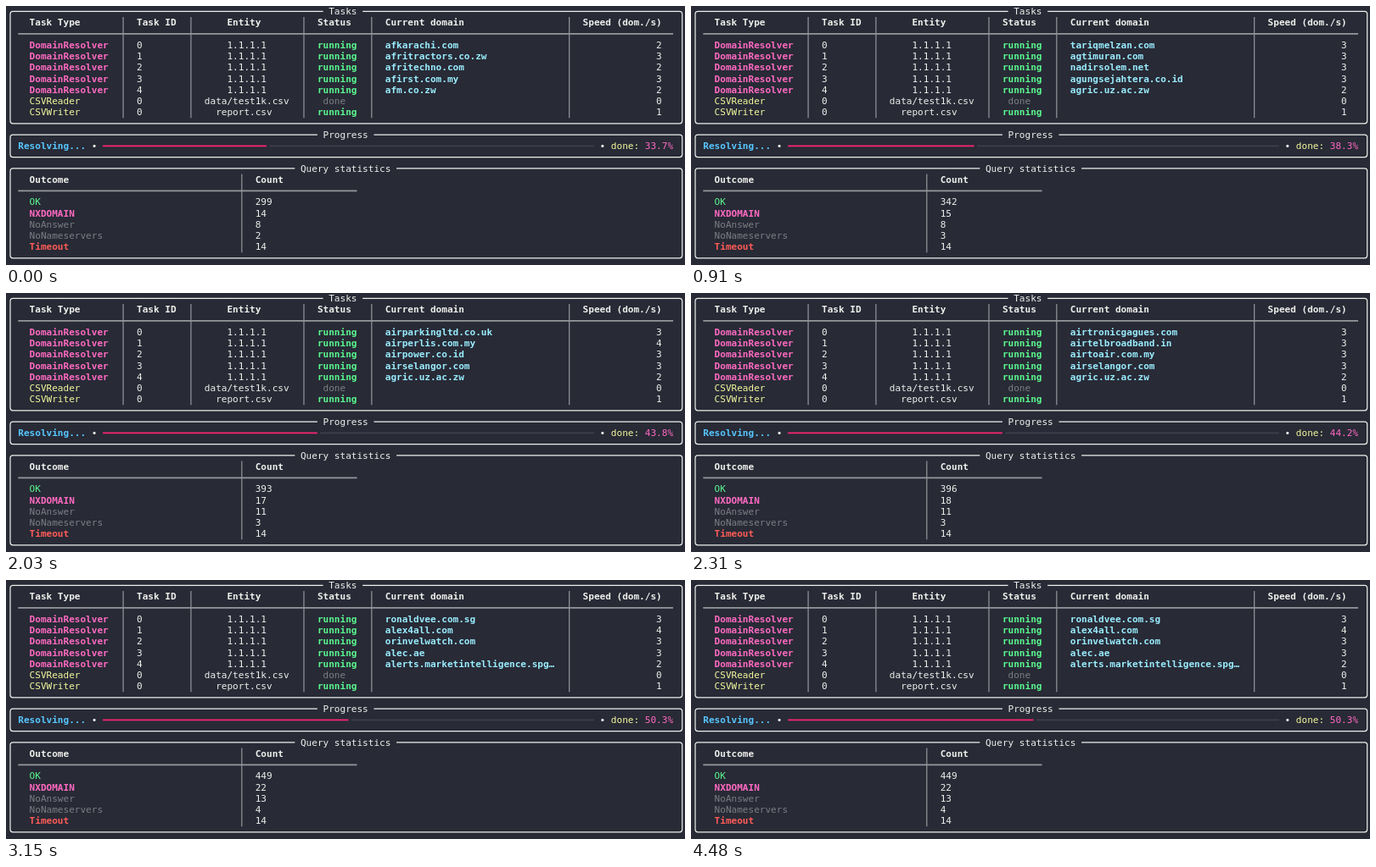
Write an HTML page that moves like this. It is 800 px wide and 306 px high and loops after 4.55 s.

```html
<!DOCTYPE html>
<html lang="en">
<head>
<meta charset="utf-8">
<title>Domain resolver</title>
<style>
  html, body { margin: 0; width: 100%; height: 100%; overflow: hidden; background: #282a36; }
  svg { display: block; }
  text { font: 11.05px "DejaVu Sans Mono", monospace; fill: #eff0eb; white-space: pre; }
  .b { font-weight: bold; }
  .magenta { fill: #ff6ac1; }
  .green { fill: #5af78e; }
  .yellow { fill: #f3f99d; }
  .blue { fill: #57c7ff; }
  .cyan { fill: #9aedfe; }
  .red { fill: #ff5c57; }
  .dim { fill: #7c7d83; }
</style>
</head>
<body>
<svg id="stage" width="800" height="306" viewBox="0 0 800 306"></svg>
<script>
const CELL = 6.653, ROW = 13.25, LOOP = 4550;
const FG = '#eff0eb', RULE = '#96979c';
const stage = document.getElementById('stage');

const x = col => 1 + col * CELL;
const y = row => 6.3 + row * ROW;

// start time, percent done, outcome counts, speeds, domains
const states = [
  [0, 33.7, [299, 14, 8, 2, 14], [2, 3, 2, 3, 2],
    'afkarachi.com afritractors.co.zw afritechno.com afirst.com.my afm.co.zw'],
  [70, 38.3, [342, 15, 8, 3, 14], [3, 3, 3, 3, 2],
    'tariqmelzan.com agtimuran.com nadirsolem.net agungsejahtera.co.id agric.uz.ac.zw'],
  [1050, 43.8, [393, 17, 11, 3, 14], [3, 4, 3, 3, 2],
    'airparkingltd.co.uk airperlis.com.my airpower.co.id airselangor.com agric.uz.ac.zw'],
  [2100, 44.2, [396, 18, 11, 3, 14], [3, 3, 3, 3, 2],
    'airtronicgagues.com airtelbroadband.in airtoair.com.my airselangor.com agric.uz.ac.zw'],
  [3150, 50.3, [449, 22, 13, 4, 14], [3, 4, 3, 3, 2],
    'ronaldvee.com.sg alex4all.com orinvelwatch.com alec.ae alerts.marketintelligence.spg…']
];

const outcomes = [['OK', 'green'], ['NXDOMAIN', 'b magenta'], ['NoAnswer', 'dim'],
  ['NoNameservers', 'dim'], ['Timeout', 'b red']];

const text = (col, row, str, cls = '') =>
  `<text x="${x(col)}" y="${y(row) + 3.7}" class="${cls}">${str}</text>`;

const line = (x1, y1, x2, y2, color, width) =>
  `<path d="M${x1} ${y1}L${x2} ${y2}" stroke="${color}" stroke-width="${width}"/>`;

function panel(top, bottom, title, col) {
  const a = y(top), b = y(bottom), l = 5, r = 796.7, c = 3;
  return `<path d="M${x(col - 1)} ${a}H${l + c}Q${l} ${a} ${l} ${a + c}V${b - c}Q${l} ${b} ${l + c} ${b}
    H${r - c}Q${r} ${b} ${r} ${b - c}V${a + c}Q${r} ${a} ${r - c} ${a}H${x(col + title.length + 1)}"
    fill="none" stroke="${FG}" stroke-width="1.2"/>` + text(col, top, title);
}

function grid(head, last, endCol, cols) {
  return cols.map(c => {
    const mid = x(c + 0.5) + 0.7;
    return line(mid, y(head - 0.5), mid, y(last + 0.5), RULE, 1.2);
  }).join('') + line(x(2), y(head + 1), x(endCol), y(head + 1), RULE, 1.8);
}

function taskRow(row, type, cls, id, entityCol, entity, running, speed) {
  return text(4, row, type, cls) + text(23, row, id) + text(entityCol, row, entity) +
    (running ? text(55, row, 'running', 'b green') : text(56, row, 'done', 'dim')) +
    text(115, row, speed);
}

const fixed = panel(0, 10, 'Tasks', 57) + panel(11, 13, 'Progress', 56) +
  panel(14, 22, 'Query statistics', 52) +
  grid(1, 9, 118, [20, 32, 52, 64, 99]) + grid(15, 21, 62, [41]) +
  [[4, 'Task Type'], [23, 'Task ID'], [39, 'Entity'], [55, 'Status'],
    [67, 'Current domain'], [102, 'Speed (dom./s)']]
    .map(([col, name]) => text(col, 1, name, 'b')).join('') +
  taskRow(8, 'CSVReader', 'yellow', 0, 35, 'data/test1k.csv', false, 0) +
  taskRow(9, 'CSVWriter', 'yellow', 0, 37, 'report.csv', true, 1) +
  text(2, 12, 'Resolving...', 'b blue') + text(15, 12, '•') + text(105, 12, '•') +
  text(107, 12, 'done:', 'yellow') +
  text(4, 15, 'Outcome', 'b') + text(44, 15, 'Count', 'b') +
  outcomes.map(([name, cls], i) => text(4, 17 + i, name, cls)).join('');

// The bar spans 87 cells and advances in half cells.
function bar(percent) {
  const end = 17 + Math.floor(174 * percent / 100) / 2;
  return line(x(end + 0.5), y(12), x(104), y(12), '#3e3f48', 1.8) +
    line(x(17), y(12), x(end), y(12), '#f92672', 1.8);
}

function render([, percent, counts, speeds, domains]) {
  stage.innerHTML = fixed + bar(percent) + text(113, 12, percent + '%', 'magenta') +
    domains.split(' ').map((name, i) =>
      taskRow(3 + i, 'DomainResolver', 'b magenta', i, 39, '1.1.1.1', true, speeds[i]) +
      text(67, 3 + i, name, 'b cyan')).join('') +
    counts.map((n, i) => text(44, 17 + i, n)).join('');
}

const start = performance.now();
let shown;
function tick() {
  const t = (performance.now() - start) % LOOP;
  const state = states.findLast(s => s[0] <= t);
  if (state !== shown) render(shown = state);
  requestAnimationFrame(tick);
}
tick();
</script>
</body>
</html>
```
